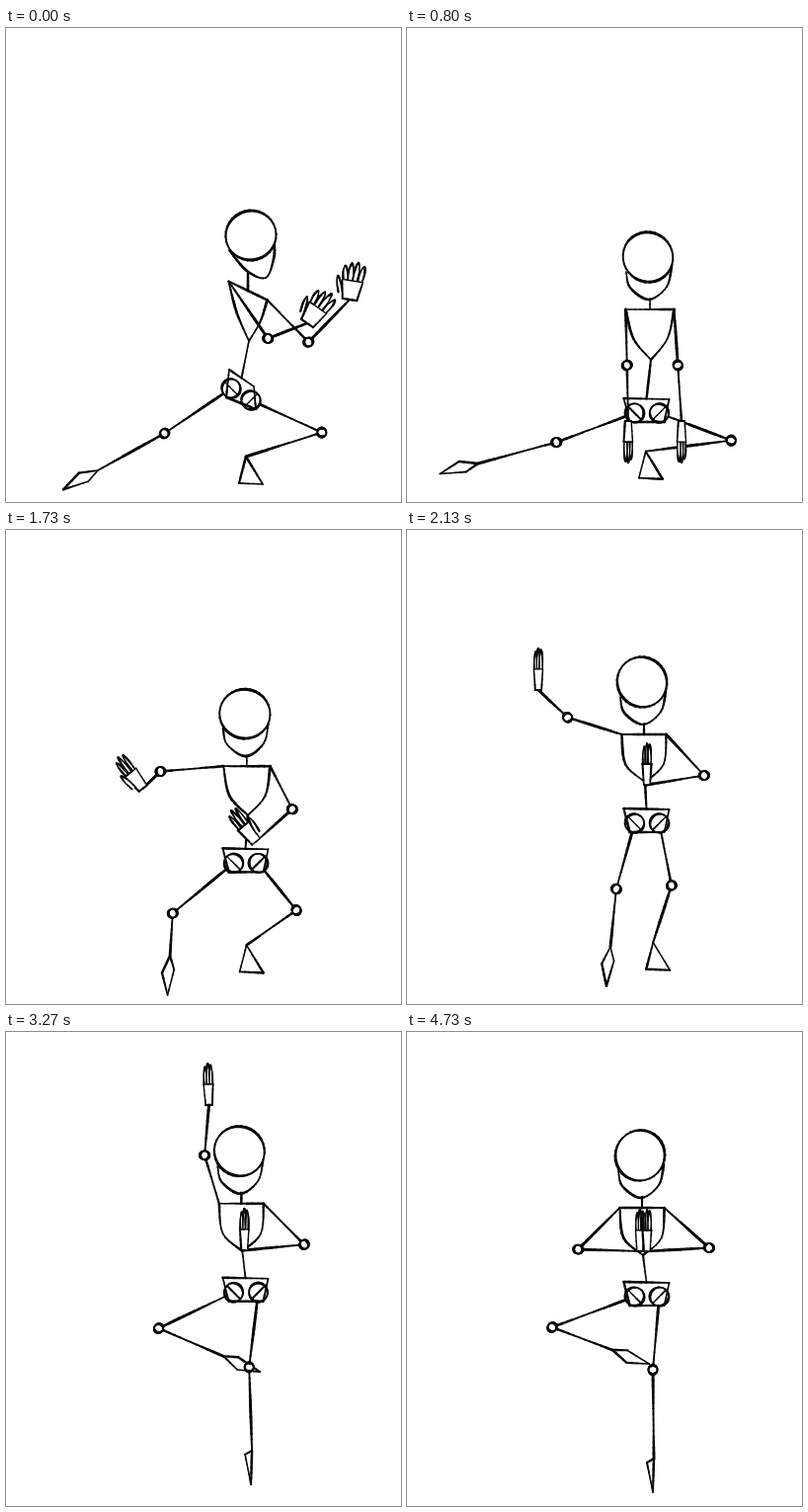
Write an HTML page with a canvas that moves like this. It is 400 px wide and 480 px high and loops after 5340 ms.

```html
<!DOCTYPE html>
<html lang="en">
<head>
<meta charset="utf-8">
<title>Stick figure dance</title>
<style>
  html, body { margin: 0; width: 100%; height: 100%; overflow: hidden; background: #fff; }
  canvas { display: block; }
</style>
</head>
<body>
<canvas id="stage" width="400" height="480"></canvas>
<script>
const ctx = document.getElementById('stage').getContext('2d');
const LOOP = 5340, BEAT = 200 / 3, LAST = 71;
const HELD = [13, 15, 27, 37, 55];   // drawings shown for two beats

// Only the driving parts have key points [beat, ...values]; the rest of the body follows by rule.
const chestPath = [[0, 245, 266], [12, 246, 285], [21, 246, 264], [32, 240, 207], [40, 239, 178], [58, 238, 175], [71, 238, 178]];
const footPathL = [[0, 93, 448], [12, 72, 441], [14, 57, 443], [21, 128, 437], [32, 206, 422], [40, 249, 404], [46, 224, 335], [71, 208, 322]];
const footPathR = [[0, 243, 434], [21, 241, 423], [36, 251, 417], [58, 248, 430], [71, 250, 432]];
const wristPathL = [[0, 305, 299], [5, 300, 310], [12, 224, 398], [21, 155, 337], [32, 133, 162], [40, 203, 66], [45, 203, 64], [58, 219, 131], [71, 236, 222]];
const wristPathR = [[0, 348, 275], [5, 342, 290], [12, 278, 398], [21, 263, 362], [32, 243, 258], [40, 241, 226], [71, 243, 222]];
const handTurn = [[0, -68], [12, 90], [21, 178], [32, 270], [71, 270]];
const handOpen = [[0, 1], [12, 0], [21, 0.8], [32, 0], [71, 0]];

// Cubic blend through the keys that comes to rest at every turning point
function follow(keys, beat) {
  const i = Math.max(1, keys.findIndex(k => k[0] >= beat));
  const a = keys[i - 1], b = keys[i], span = b[0] - a[0], u = (beat - a[0]) / span;
  const slope = (n, j) => {
    const p = keys[n - 1] || keys[n], k = keys[n], q = keys[n + 1] || keys[n];
    return (k[j] - p[j]) * (q[j] - k[j]) > 0 ? (q[j] - p[j]) / (q[0] - p[0]) * span : 0;
  };
  return a.slice(1).map((v, n) => {
    const j = n + 1, ease = u * u * (3 - 2 * u);
    return v + (b[j] - v) * ease + slope(i - 1, j) * u * (1 - u) ** 2 - slope(i, j) * u * u * (1 - u);
  });
}

let seed = 1;
function rand() {
  seed = (seed * 16807) % 2147483647;
  return seed / 2147483647;
}

const ramp = (beat, from, to) => Math.min(1, Math.max(0, (beat - from) / (to - from)));
const blend = (a, b, u) => a + (b - a) * u;
const mix = (a, b, u) => [blend(a[0], b[0], u), blend(a[1], b[1], u)];
const shift = (p, x, y) => [p[0] + x, p[1] + y];
const dist = (a, b) => Math.hypot(b[0] - a[0], b[1] - a[1]);
const toward = (a, b, d) => mix(a, b, d / dist(a, b));

// Catmull-Rom curve through the given points
function smooth(pts) {
  const out = [pts[0]];
  for (let i = 0; i < pts.length - 1; i++) {
    const [a, b, c, d] = [pts[i - 1] || pts[i], pts[i], pts[i + 1], pts[i + 2] || pts[i + 1]];
    for (let s = 1; s <= 6; s++) {
      const u = s / 6;
      out.push([0, 1].map(k => b[k] + u * (c[k] - a[k]) / 2
        + u * u * (a[k] - 2.5 * b[k] + 2 * c[k] - d[k] / 2)
        + u ** 3 * (1.5 * (b[k] - c[k]) + (d[k] - a[k]) / 2)));
    }
  }
  return out;
}

// Pen stroke whose weight swells and thins along the way
function ink(pts, width = 2.1, fill = false) {
  if (fill) {
    ctx.beginPath();
    pts.forEach(p => ctx.lineTo(...p));
    ctx.fill();
  }
  let phase = rand() * 6;
  for (let i = 1; i < pts.length; i++) {
    const steps = Math.ceil(dist(pts[i - 1], pts[i]) / 6) || 1;
    for (let s = 0; s < steps; s++) {
      phase += 0.25 + rand() * 0.3;
      ctx.lineWidth = width * (1 + 0.25 * Math.sin(phase));
      ctx.beginPath();
      ctx.moveTo(...mix(pts[i - 1], pts[i], s / steps));
      ctx.lineTo(...mix(pts[i - 1], pts[i], (s + 1) / steps));
      ctx.stroke();
    }
  }
}

function ring([x, y], radius, width, fill) {
  const start = rand() * 6, pts = [];
  for (let i = 0; i <= 32; i++) {
    const a = start + i * Math.PI / 16;
    const r = radius * (1 + 0.015 * Math.sin(2 * a + start));
    pts.push([x + r * Math.cos(a), y + r * Math.sin(a)]);
  }
  ink(pts, width, fill);
}

function limb(from, joint, end) {
  ink([from, joint], 2.4);
  ink([joint, end], 2.4);
  ring(joint, 4.5, 2.4, true);
}

// The elbow swings outwards (downwards while the body is turned), further the closer the wrist comes
function findElbow(shoulder, wrist, out, turn) {
  const reach = dist(shoulder, wrist) || 1;
  const dx = (wrist[0] - shoulder[0]) / reach, dy = (wrist[1] - shoulder[1]) / reach;
  const pole = mix([out, -out * dx * dy], [0, 1], turn);
  const bend = Math.max(0, 1.8 * (55.5 - reach / 2)) + 18 * turn;
  return toward(mix(shoulder, wrist, 0.5), shift(mix(shoulder, wrist, 0.5), ...pole), bend);
}

function drawArm(shoulder, wrist, out, turn, angle, open) {
  limb(shoulder, findElbow(shoulder, wrist, out, turn), wrist);
  drawHand(wrist, angle, open, turn ? -1 : out);
}

function drawHand(wrist, angle, open, thumbSide) {
  const rad = angle * Math.PI / 180, cos = Math.cos(rad), sin = Math.sin(rad);
  const at = (x, y) => shift(wrist, x * cos - y * sin, x * sin + y * cos);
  const width = 9 + 12 * open, half = width / 2, length = 44 - 4 * open, palm = length * 0.48;
  const finger = (x, y, lean, len, r) => ink(smooth([
    at(x, y - r), at(x + len * 0.6, y + lean * 0.6 - r), at(x + len, y + lean),
    at(x + len * 0.6, y + lean * 0.6 + r), at(x, y + r)]), 1.8, true);
  const count = 3 + Math.round(open);
  for (let i = 0; i < count; i++) {
    const side = i - (count - 1) / 2;
    finger(palm - 1, side * width / (count + 0.4), side * 1.6 * open,
      (length - palm) * (1 - Math.abs(side - 0.3) * 0.15), Math.max(1.5, width / 9));
  }
  ink([at(0, -half * 0.7), at(palm, -half), at(palm, half), at(0, half * 0.7), at(0, -half * 0.7)], 1.8, true);
  if (open > 0.3) finger(palm * 0.3, thumbSide * half, thumbSide * 5 * open, palm * 0.85, 2);
}

function drawHead(chest, turn) {
  const head = shift(chest, -2 + 5 * turn, -53 - 3 * turn);
  const at = (x, y) => shift(head, x, y);
  ink([at(2 - 5 * turn, 42 - 5 * turn), chest]);
  ink(smooth([at(-22, 15), at(-18 + 14 * turn, 31 + 5 * turn), at(1 + 14 * turn, 43),
    at(19 + 4 * turn, 30 - 6 * turn), at(24, 9)]), 2.2);
  ring(head, 25.3, 2.5, false);
}

function drawTorso(chest, shoulders, waist, bulge) {
  ink([shoulders[0], chest, shoulders[1]]);
  shoulders.forEach((s, i) =>
    ink(smooth([s, shift(mix(s, waist, 0.5), i ? bulge : -bulge, bulge * 0.8), waist]), 2.2));
}

function drawPelvis([hipL, hipR], waist, turn) {
  const left = shift(hipL, -11 + 9 * turn, -15 - 4 * turn);
  const right = shift(hipR, 10 - 7 * turn, -14);
  ink([waist, mix(left, right, 0.5)]);
  ink([left, right, shift(hipR, 5, 9), shift(hipL, -5, 9), left]);
  [hipL, hipR].forEach((hip, i) => {
    const tilt = i ? 6 : -6;
    ring(hip, 9.5, 2.3, false);
    ink([shift(hip, -6, tilt), shift(hip, 6, -tilt)], 1.7);
  });
}

// The free leg stays straight until the foot comes close, then the knee opens sideways
function drawFreeLeg(hip, ankle, legLength) {
  const half = dist(hip, ankle) / 2;
  const bend = Math.sqrt(Math.max(0, legLength ** 2 - half ** 2));
  const knee = shift(mix(hip, ankle, 0.5), -bend, 4);
  limb(toward(hip, knee, 10), knee, ankle);
  const toe = toward(ankle, shift(ankle, ankle[0] - knee[0], ankle[1] - knee[1]), 40);
  const dx = (toe[0] - ankle[0]) / 40, dy = (toe[1] - ankle[1]) / 40;
  const side = (u, w) => shift(mix(ankle, toe, u), -dy * w, dx * w);
  ink([ankle, side(0.45, 7), toe, side(0.35, -5), ankle], 2);
}

// The standing knee moves out and down as the hip sinks
function drawStandingLeg(hip, ankle, pointe) {
  const sink = hip[1] - 268;
  const knee = [249 + 0.65 * sink, 342 + 0.62 * sink];
  limb(toward(hip, knee, 10), knee, ankle);
  const heel = shift(ankle, -7, blend(27, 4, pointe));
  const toe = shift(ankle, blend(17, -1, pointe), blend(28, 34, pointe));
  ink([ankle, heel, toe, ankle], 2);
}

function draw(beat) {
  seed = 977 + beat * 7919;
  ctx.fillStyle = '#fff';
  ctx.fillRect(0, 0, 400, 480);
  ctx.strokeStyle = '#080808';
  ctx.lineCap = ctx.lineJoin = 'round';

  const turn = 1 - ramp(beat, 0, 12), rise = ramp(beat, 21, 32);
  const chest = follow(chestPath, beat);
  const waist = shift(chest, 1, 51 - 3 * rise);
  const pelvis = [243 - 5 * turn, chest[1] + 105 - 15 * rise];
  const pair = (center, half, tilt) =>
    [-1, 1].map(s => shift(center, s * half * (1 - 0.2 * turn), s * tilt * turn));
  const shoulders = pair(chest, 24.5 - 2 * rise, 9.5);
  const hips = pair(pelvis, 12.5, 6);

  drawHead(chest, turn);
  drawTorso(chest, shoulders, waist, 5 - 3 * turn + 3 * rise);
  drawPelvis(hips, waist, turn);
  drawFreeLeg(hips[0], follow(footPathL, beat), 64 + 14 * ramp(beat, 32, 45));
  drawStandingLeg(hips[1], follow(footPathR, beat), ramp(beat, 33, 40));

  const salute = Math.max(0, 1 - Math.abs(beat - 58) / 10);
  const [angle] = follow(handTurn, beat), [open] = follow(handOpen, beat);
  drawArm(shoulders[0], follow(wristPathL, beat), -1, turn, angle + 13 * turn - 18 * salute, open + 0.4 * salute);
  drawArm(shoulders[1], follow(wristPathR, beat), 1, turn, angle - 13 * turn, open);
}

function tick() {
  const time = performance.now() % LOOP;
  let beat = Math.min(LAST, Math.floor((time + 3.5) / BEAT));
  if (HELD.includes(beat)) beat--;
  draw(beat);
  requestAnimationFrame(tick);
}
tick();
</script>
</body>
</html>
```
